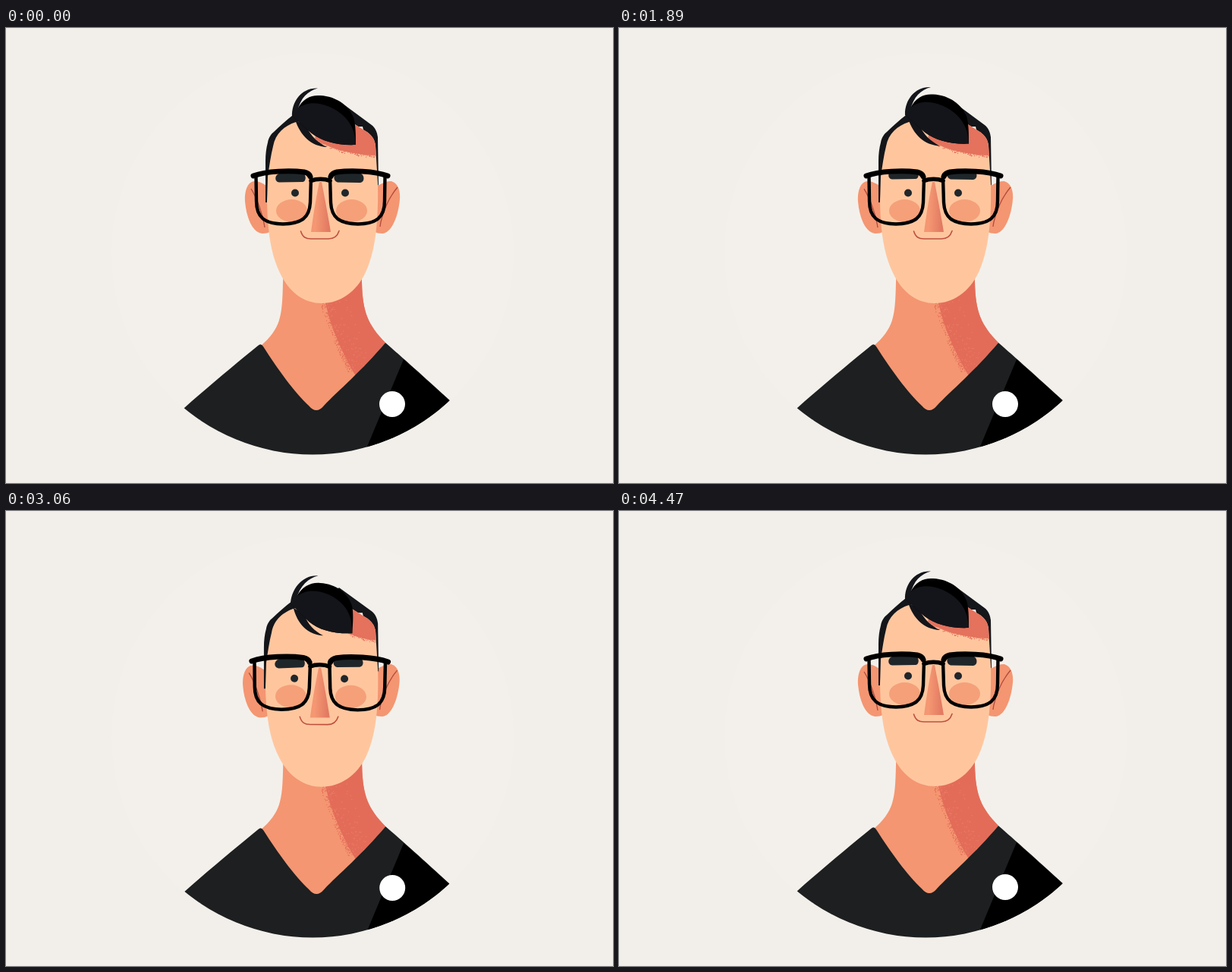
An HTML page for the animation above (4.5 s loop, 800 by 600 pixels).

```html
<!DOCTYPE html>
<html lang="en">
<head>
<meta charset="utf-8">
<title>Portrait</title>
<style>
  html, body { margin: 0; width: 100%; height: 100%; overflow: hidden; background: #f2eee9; }
  svg { display: block; width: 100vw; height: 100vh; }
</style>
</head>
<body>
<svg viewBox="0 0 800 600">
  <defs>
    <clipPath id="badge"><circle cx="404" cy="298" r="264.500"/></clipPath>
    <clipPath id="faceClip"><path id="faceMask"/></clipPath>
    <linearGradient id="noseTone" x1="0" x2="1" y1="0" y2=".08">
      <stop offset=".3" stop-color="#f49772"/>
      <stop offset=".95" stop-color="#e27a62"/>
    </linearGradient>
  </defs>
  <circle cx="404" cy="298" r="265" fill="#f3f0eb"/>

  <g clip-path="url(#badge)">
    <g id="body">
      <path fill="#f49671" d="M366 300L365 335C364 382 362 396 335 420L409 515L500 415C477 391 470 375 469 335L468 300Z"/>
      <path fill="#e36c59" d="M415 335L421 362C427 390 440 424 463 462L500 415C477 391 470 375 469 335L468 312Z"/>
      <path id="neckDust" fill="none" stroke="#e36c59" stroke-width="1.2"/>
      <path id="neckGaps" fill="none" stroke="#ea7e64" stroke-width="1.1"/>
      <path fill="#1d1f20" d="M190 540L235 501C270 470 305 441 332 419Q336 415 339 420C358 450 380 480 399 498Q409 510 419 498C437 479 470 451 500 415C530 441 560 468 620 523L620 620L190 620Z"/>
      <path fill="#000" d="M524 437L471 564L620 620L620 523C580 487 550 460 524 437Z"/>
      <circle cx="509" cy="496" r="17" fill="#fff"/>
    </g>
  </g>

  <g id="earL">
    <path fill="#f49671" d="M356 218C346 209 336 202 328 202C318 202 314 216 315 229C317 251 325 270 338 271C346 271 351 268 356 262Z"/>
    <path fill="none" stroke="#b04a3c" stroke-width="1.3" d="M323 212C330 223 338 244 341 263"/>
  </g>
  <g id="earR">
    <path fill="#f49671" d="M476 218C487 209 498 202 507 202C516 203 520 214 519 226C517 249 508 270 496 271C488 271 482 268 476 262Z"/>
    <path fill="none" stroke="#b04a3c" stroke-width="1.3" d="M516 210C504 224 495 245 493 262"/>
  </g>

  <path id="band" fill="#14161a"/>
  <path id="face" fill="#ffc69e"/>
  <g clip-path="url(#faceClip)">
    <path id="shade" fill="#e4725d"/>
    <path id="shadeDust" fill="none" stroke="#e4725d" stroke-width="1.2"/>
  </g>
  <path id="strand" fill="#14151a"/>
  <path id="mass" fill="#000"/>
  <path id="front" fill="#14151a"/>
  <path id="curl" fill="#14161a"/>

  <g id="features">
    <ellipse cx="376.500" cy="241" rx="20.500" ry="15" fill="#f5a079"/>
    <ellipse cx="455.500" cy="241" rx="20.500" ry="15" fill="#f5a079"/>
    <path fill="url(#noseTone)" d="M413 203L416 203C420 224 425 250 428 269L402 269C405 246 409 222 413 203Z"/>
    <circle cx="381" cy="217.500" r="5" fill="#20262a"/>
    <circle cx="447" cy="217.500" r="5" fill="#20262a"/>
    <g id="brows" fill="#1f262a">
      <path d="M361 191.500C372 190 385 190 391 191.500C396 193 396 202.500 391 203L360 203.500C354 203 353 194 361 191.500Z"/>
      <path d="M436 191.500C444 190 458 190 467 191.500C473 194 473 203 467 204L437 203.500C431 202 431 193 436 191.500Z"/>
    </g>
    <g id="mouth"><path fill="none" stroke="#c0503f" stroke-width="1.6" stroke-linecap="round" d="M388.500 268C391 276 395 278 402 278L425 278C433 278 437 274 439 267.500"/></g>
    <g id="glasses" fill="none" stroke="#000" stroke-linecap="round" stroke-linejoin="round">
      <path id="lens" stroke-width="4.4" d="M329.500 195L330 228C330 250 341 258 365 258.500C390 258 400 250 401 230L402 197"/>
      <use href="#lens" transform="translate(829 0) scale(-1 1)"/>
      <g stroke-width="7">
        <path id="barL" d="M326 195C343 188.500 375 187.500 393 190C398 191 400 193 401 196"/>
        <path id="barR" d="M503 195C486 188.500 454 187.500 436 190C431 191 429 193 428 196"/>
      </g>
      <path stroke-width="5.500" d="M402 201.500C409 198.500 420 198.500 427 201.500"/>
    </g>
  </g>
</svg>
<script>
const LOOP = 4500;
const $ = id => document.getElementById(id);
const clamp = v => Math.max(0, Math.min(1, v));
const mix = (a, b, k) => a + (b - a) * k;

// Quick start, long settle: cubic-bezier(.35, 0, .15, 1)
function settle(p) {
  let lo = 0, hi = 1, s = .5;
  for (let i = 0; i < 18; i++) {
    s = (lo + hi) / 2;
    const q = 1 - s;
    const x = 3 * q * q * s * .35 + 3 * q * s * s * .15 + s * s * s;
    if (x < p) lo = s; else hi = s;
  }
  return s * s * (3 - 2 * s);
}
const smooth = p => p * p * (3 - 2 * p);

// Tracks are [time, value] keys.
function track(keys, time, ease = settle) {
  let [t0, v0] = keys[0];
  for (const [t1, v1] of keys) {
    if (time < t1) return mix(v0, v1, ease(clamp((time - t0) / (t1 - t0))));
    t0 = t1;
    v0 = v1;
  }
  return v0;
}
const TURN = [[0, 0], [750, 1], [1130, 1], [1880, 0]];
const UP = [[2080, 0], [2820, 1], [2830, 1], [3380, 0]];
const DOWN = [[2830, 0], [3360, 1], [3370, 1], [4250, 0]];
const BROW = [[1780, 0], [1890, 4], [2120, 4], [2700, 11], [2830, 11], [3300, 0]];
const LIFT = [[0, 0], [540, -2], [1170, 1.5], [1430, 4], [1890, 1.5], [2250, 0]];

let seed = 7;
const rand = () => (seed = seed * 16807 % 2147483647) / 2147483647;
const dot = (x, y) => `M${x.toFixed(1)} ${y.toFixed(1)}L${(x + 1.1).toFixed(1)} ${y.toFixed(1)}`;
const dots = (n, make) => Array.from({ length: n }, () => dot(...make())).join('');

const neckEdge = y => 421 + 42 * Math.pow((y - 355) / 105, 1.3);
const neckPoint = side => () => {
  const y = 356 + rand() * 98;
  const r = rand();
  return [neckEdge(y) + side * r * r * (side < 0 ? 9 : 30), y];
};
$('neckDust').setAttribute('d', dots(330, neckPoint(-1)));
$('neckGaps').setAttribute('d', dots(110, neckPoint(1)));

const browDust = dots(130, () => {
  const x = 410 + rand() * 78;
  const r = rand();
  return [x, 147 + 20 * (1 - Math.pow((488 - x) / 80, 2)) + r * r * 4];
});

const SHAPES = {
  band: ['M342 230L342 176C342 166 343 158 345 151C346 145 349 140 353 137C361 129 369 122 378 115L440 97L482 128C487 132 489 137 490 144L491 208L486 200L470 130L390 130L350 176L344 230Z', headAt],
  face: ['M344 230C345 270 349 298 361 323C374 350 394 363 416 363C440 363 462 348 474 322C487 294 491 255 490 205L487 155C486 146 481 140 474 136L455 124L400 120L382 124C367 129 355 139 352 156C349 168 347 182 345 196Z', headAt],
  shade: ['M407 146C424 158 452 167 489 168L492 130L462 110L412 125Z', shadeAt],
  shadeDust: [browDust, shadeAt],
  strand: ['M381 121C388 142 402 156 423 157C411 151 402 143 396 130Z', hairAt],
  mass: ['M384 107C391 93 402 88 414 89C436 90 452 103 458 118C461 127 461 141 461 154C438 155 417 150 403 139C396 133 389 127 384 122L377 116Z', hairAt],
  front: ['M377 116L384 107C398 93 428 99 446 117C455 126 460 137 461 154C438 155 417 150 403 139C396 133 389 127 384 122Z', hairAt],
  curl: ['M377 117C376 97 390 78 411 79.500C398 83 388 92 384 110Z', hairAt]
};

function headAt(x, y, p) {
  const crown = Math.max(0, 1 - Math.abs(x - 390) / 60) * clamp((150 - y) / 25);
  const chin = clamp((y - 230) / 130);
  const across = (x - 343) / 147;
  const side = mix(2, 4.5, clamp((y - 170) / 60));
  return [
    x + p.turn * (side + 14 * crown + 3.5 * chin) + p.up * (3 - 2 * chin) + p.down * (-4 + 3 * across + 2 * chin),
    y - p.turn * 9 * crown * clamp((122 - y) / 8) - p.up * mix(16, 10.5, chin) + p.down * mix(12, 5, chin)
  ];
}
function hairAt(x, y, p) {
  const v = (y - 80) / 75;
  return [
    x + p.turn * 16.5 + p.up * (2 + 7 * v) - p.down * 10 * v,
    y - p.up * (17 + 5 * v) + p.down * (14.5 + 4 * v) - p.lift
  ];
}
function shadeAt(x, y, p) {
  const s = clamp((x - 410) / 78);
  return [
    x + p.turn * mix(16, 3, s) + p.up * mix(9, 3, s) + p.down * 28 * (1 - s),
    y - p.up * mix(22, 16, s) + p.down * 10 - p.turn * 2
  ];
}
const warp = (d, at, p) => d.replace(/([\d.]+) ([\d.]+)/g, (_, x, y) =>
  at(+x, +y, p).map(n => n.toFixed(2)).join(' '));

const move = (id, x, y, extra = '') =>
  $(id).setAttribute('transform', `translate(${x.toFixed(2)} ${y.toFixed(2)})${extra}`);
const turnBy = (deg, x, y) => ` rotate(${deg.toFixed(3)} ${x} ${y})`;
// Horizontal scale around a fixed x
const widen = (id, k, x) => move(id, x * (1 - k), 0, ` scale(${k.toFixed(4)} 1)`);

function draw(time) {
  const p = {
    turn: track(TURN, time),
    up: track(UP, time),
    down: track(DOWN, time),
    lift: track(LIFT, time, smooth)
  };
  const { turn, up, down } = p;
  const late = track(TURN, time - 100);

  for (const id in SHAPES) {
    const [d, at] = SHAPES[id];
    $(id).setAttribute('d', warp(d, at, p));
  }
  $('faceMask').setAttribute('d', $('face').getAttribute('d'));

  move('body', 3 * turn - .5 * up + .5 * down, -1.5 * up + 2 * down);
  move('earL', -late + 3 * up - 5 * down, 4 * late - 14 * up + 7.5 * down, turnBy(-7 * late, 336, 238));
  move('earR', -late + up - down, -2 * late - 10 * up + 4 * down);
  move('features', 11 * turn + 2.5 * up - 2.3 * down, -19 * up + 12.3 * down, turnBy(-2 * turn + 1.2 * up, 414, 225));
  move('brows', -turn + 2 * up - down, -track(BROW, time) + 1.5 * turn + 2 * down, turnBy(-.4 * turn - 2 * down, 414, 197));
  move('mouth', 0, 0, turnBy(-2 * turn, 414, 273));
  widen('glasses', 1 + .02 * down, 414.5);
  widen('barL', 1 - .06 * turn, 401);
  widen('barR', 1 - .03 * turn, 428);
}

function frame(now) {
  draw(now % LOOP);
  requestAnimationFrame(frame);
}
draw(0);
requestAnimationFrame(frame);
</script>
</body>
</html>
```
